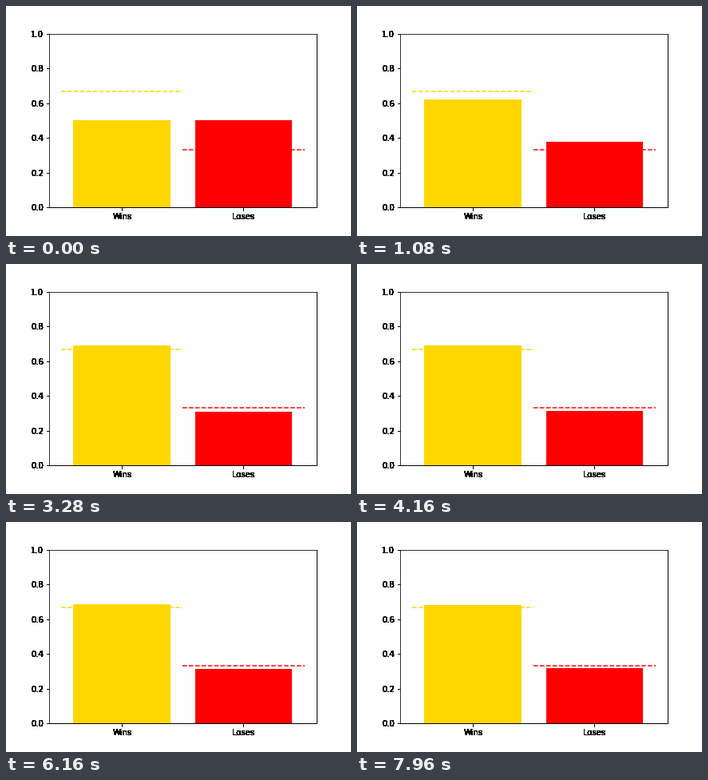
Animation of 432x288 px, one loop 8 s. Source, as a matplotlib script:

```python
import numpy as np
import matplotlib.pyplot as plt
from matplotlib.animation import FuncAnimation

FRAMES, INTERVAL = 200, 40
DPI = 72
OVERPRINTS = 30
COLORS = ["gold", "red"]
LABELS = ["Wins", "Loses"]

# Turning points of the tally: (games played, games won).
TALLY = [(2, 1), (4, 3), (12, 7), (50, 33), (67, 48),
         (84, 58), (129, 89), (156, 107), (201, 137)]

plt.rcParams.update({"font.family": "DejaVu Sans", "font.size": 10})

fig = plt.figure(figsize=(6, 4), dpi=DPI, facecolor="white")
fig.subplots_adjust(left=0.125, right=0.9, bottom=0.125, top=0.88)
ax = fig.add_subplot(facecolor="#fefefe")

# Expected shares, hidden where a bar covers them.
for x, (share, color) in enumerate(zip((2 / 3, 1 / 3), COLORS)):
    ax.hlines(share, x - 0.5, x + 0.5, colors=color, linestyles="dashed",
              linewidth=1.5, zorder=0.9)

bars = ax.bar([0, 1], [0.5, 0.5], width=0.8, color=COLORS, zorder=1)
ax.set_xlim(-0.6, 1.6)
ax.set_ylim(0, 1)
ax.set_xticks([0, 1], LABELS)
ax.set_yticks(np.linspace(0, 1, 6))


def overprint(times):
    """Draw the axes over themselves so soft edges outside them turn solid."""
    fig.canvas.draw()
    renderer = fig.canvas.get_renderer()
    for _ in range(times):
        ax.draw(renderer)
    backdrop = np.array(renderer.buffer_rgba())
    fig.figimage(backdrop, origin="upper", zorder=-1)


def win_share(games):
    """Share of wins so far; whole games only, spread evenly between turns."""
    wins = np.floor(np.interp(games, *zip(*TALLY)) + 1e-6)
    return wins / games


def update(frame):
    share = win_share(frame + 2)
    bars[0].set_height(share)
    bars[1].set_height(1 - share)
    return list(bars)


overprint(OVERPRINTS)
anim = FuncAnimation(fig, update, frames=FRAMES, interval=INTERVAL,
                     repeat=True, repeat_delay=0, blit=False)
plt.show()
```
